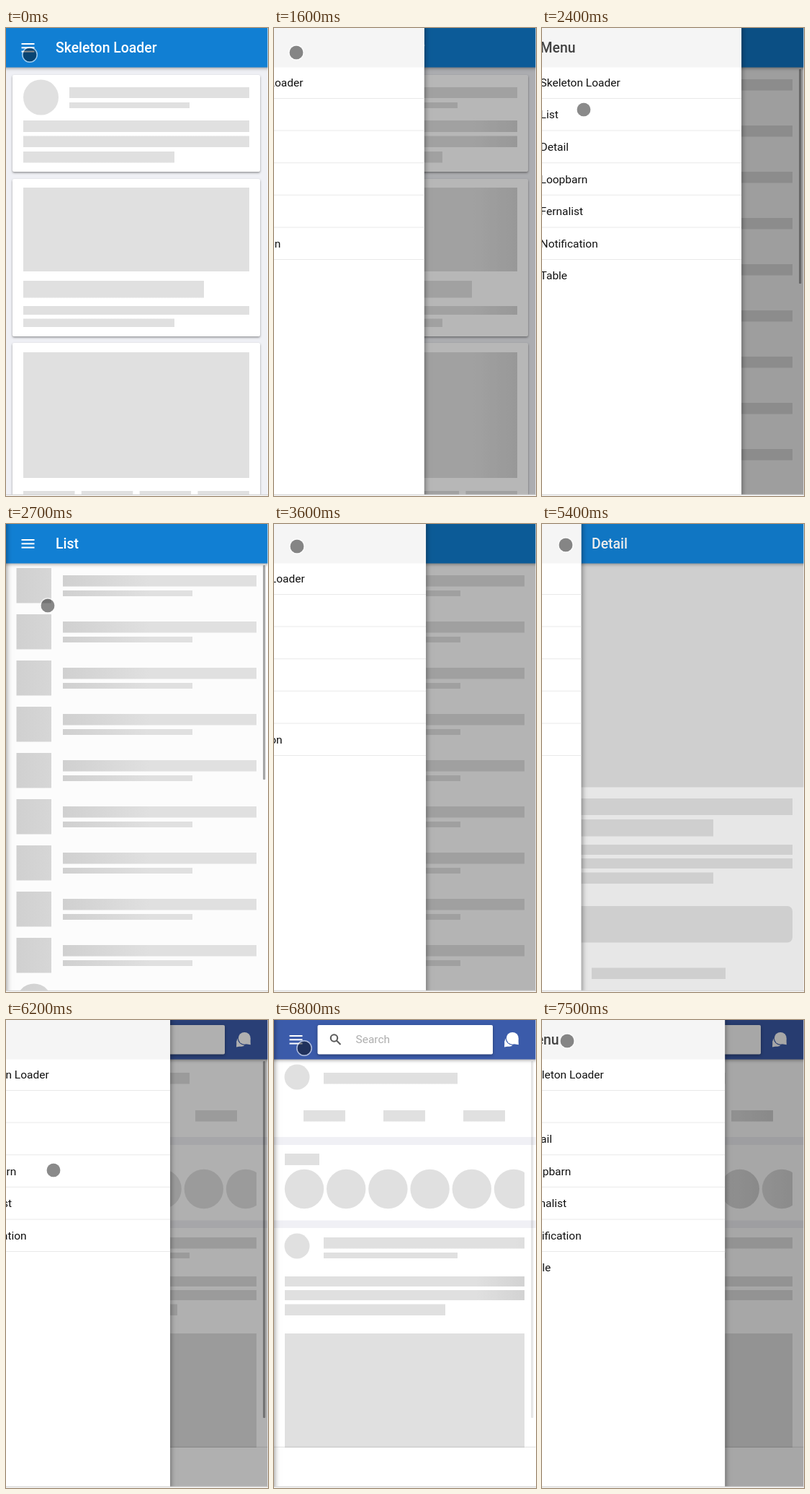
An HTML page with a canvas that plays this animation: 364x648 px, repeating every 7600 ms.

```html
<!DOCTYPE html>
<html lang="en">
<head>
<meta charset="utf-8">
<title>Skeleton Loader</title>
<style>
html, body { margin: 0; width: 100%; height: 100%; overflow: hidden; background: #fff; }
canvas { display: block; width: 364px; height: 648px; }
</style>
</head>
<body>
<canvas></canvas>
<script>
const W = 364, H = 648, LOOP = 7600, MENU_W = 295, SLIDE = 280;
const BLUE = '#117fd3', NAVY = '#3b5baa', BASE = '#e0e0e0', DARK = '#d0d0d0';
const canvas = document.querySelector('canvas');
const ctx = canvas.getContext('2d');
const dpr = window.devicePixelRatio || 1;
canvas.width = W * dpr;
canvas.height = H * dpr;

const items = ['Skeleton Loader', 'List', 'Detail', 'Loopbarn', 'Fernalist', 'Notification', 'Table'];

// since: start of the shimmer; bar: bottom end of the scroll indicator
const pages = [
  { from: 0, since: -100, draw: home },
  { from: 2354, since: 2354, draw: list, bar: 354 },
  { from: 4264, since: 4264, draw: detail, bar: 640 },
  { from: 6110, since: 6085, draw: feed, bar: 551 }
];
const slides = [[1502, 2354], [3500, 4264], [5386, 6110], [7352, 9000]]; // [open, close]
const touches = [ // [time, x, y]
  [0, 33, 37], [800, 30, 32], [1600, 31, 34], [1700, 31, 34], [2200, 58, 113], [2750, 58, 113],
  [3350, 32, 31], [3650, 32, 31], [4150, 71, 163], [4550, 71, 163], [5200, 33, 29],
  [5600, 33, 29], [6000, 66, 208], [6350, 66, 208], [6800, 42, 39], [7100, 35, 29], [7600, 35, 29]
];

const clamp = v => Math.min(1, Math.max(0, v));
let shift = 0; // current shimmer offset

function bezier(x1, y1, x2, y2, t) {
  const at = (a, b, s) => 3 * (1 - s) * (1 - s) * s * a + 3 * (1 - s) * s * s * b + s ** 3;
  let lo = 0, hi = 1;
  for (let i = 0; i < 20; i++) {
    const mid = (lo + hi) / 2;
    if (at(x1, x2, mid) < t) lo = mid; else hi = mid;
  }
  return at(y1, y2, lo);
}

function rect(x, y, x2, y2, fill, r = 0) {
  ctx.fillStyle = fill;
  ctx.beginPath();
  ctx.roundRect(x, y, x2 - x, y2 - y, r);
  ctx.fill();
}

function raised(blur, dy, alpha, draw) {
  ctx.save();
  ctx.shadowColor = `rgba(0,0,0,${alpha})`;
  ctx.shadowBlur = blur * dpr;
  ctx.shadowOffsetY = dy * dpr;
  draw();
  ctx.restore();
}

function text(str, x, y, size, color, weight = 400) {
  ctx.font = `${weight} ${size}px Roboto, sans-serif`;
  ctx.fillStyle = color;
  ctx.fillText(str, x, y);
}

function disc(x, y, r, fill) {
  ctx.fillStyle = fill;
  ctx.beginPath();
  ctx.arc(x, y, r, 0, 7);
  ctx.fill();
}

// Placeholder block; the shimmer is placed relative to its own left edge
function bone(x, y, x2, y2, r = 0) {
  const g = ctx.createLinearGradient(x + shift + 64, 0, x + shift + 264, 0);
  g.addColorStop(0, BASE);
  g.addColorStop(0.4, DARK);
  g.addColorStop(1, BASE);
  rect(x, y, x2, y2, g, r);
}

const roundBone = (x, y, r) => bone(x - r, y - r, x + r, y + r, r);

function header(color, title) {
  raised(5, 1.5, 0.4, () => rect(-9, -9, W + 9, 54.5, color));
  for (const y of [21, 26.3, 31.6]) rect(21.5, y, 39.5, y + 2, '#fff');
  if (title) text(title, 69, 34.2, 19.4, '#fff', 500);
}

function card(y, y2) {
  raised(3, 1.5, 0.4, () => rect(9, y, 353, y2, '#fff', 2));
}

function home() {
  rect(0, 0, W, H, '#eff0f5');
  card(65, 199);
  roundBone(48.5, 96, 24.5);
  bone(88, 82, 338, 97);
  bone(88, 103, 255, 111);
  bone(24, 128, 338, 144);
  bone(24, 149.5, 338, 165);
  bone(24, 171, 234, 186.5);
  card(209, 427);
  bone(24, 221, 338, 337);
  bone(24, 350, 275, 373.5);
  bone(24, 385, 338, 397);
  bone(24, 402.5, 234, 414);
  card(436, 700);
  bone(24, 449, 338, 623);
  for (let i = 0; i < 4; i++) bone(24 + 80.8 * i, 641, 95.5 + 80.8 * i, 660);
  header(BLUE, 'Skeleton Loader');
}

function list() {
  rect(0, 0, W, H, '#fcfcfc');
  for (let i = 0; i < 9; i++) {
    const y = 61 + 64 * i;
    bone(14.5, y, 63, y + 48.5);
    bone(79, y + 10, 348, y + 25.5);
    bone(79, y + 31, 259, y + 39);
  }
  roundBone(39, 661, 24.5);
  header(BLUE, 'List');
}

function detail() {
  rect(0, 0, W, H, '#fafafa');
  bone(0, 54, W, 364.5);
  bone(15, 380, 348, 403);
  bone(15, 409, 238, 432.5);
  bone(15, 444, 348, 458);
  bone(15, 463, 348, 477);
  bone(15, 482.5, 238, 498);
  bone(15, 529, 348, 579.5, 7);
  roundBone(32, 621, 17.5);
  bone(69, 614.5, 255, 630);
  header(BLUE, 'Detail');
}

function feed() {
  rect(0, 0, W, H, '#fff');
  roundBone(32, 79, 17.5);
  bone(69, 73, 255, 88.5);
  for (let i = 0; i < 3; i++) bone(41 + 111 * i, 125, 99 + 111 * i, 140.5);
  rect(0, 162, W, 173, '#f0f0f5');
  bone(15, 185, 63, 201);
  ctx.save();
  ctx.beginPath();
  ctx.rect(0, 200, 348, 70);
  ctx.clip();
  for (let i = 0; i < 6; i++) roundBone(42 + 58.2 * i, 234, 27.2);
  ctx.restore();
  rect(0, 277.5, W, 288, '#f0f0f5');
  roundBone(32, 313, 17.5);
  bone(69, 301, 348, 316.5);
  bone(69, 322, 255, 330);
  bone(15, 355, 348, 369);
  bone(15, 374, 348, 388);
  bone(15, 393.5, 238, 409);
  rect(15, 434, 348, 592, BASE);
  raised(2, -0.5, 0.3, () => rect(-9, 592, W + 9, 670, '#fff'));

  header(NAVY);
  raised(4, 1.5, 0.35, () => rect(60.5, 7, 304, 47.5, '#fff', 2));
  ctx.strokeStyle = '#5b5b5b';
  ctx.lineWidth = 2.1;
  ctx.beginPath();
  ctx.arc(83.5, 25, 4.7, 0, 7);
  ctx.moveTo(87, 28.5);
  ctx.lineTo(92.5, 34);
  ctx.stroke();
  text('Search', 113.5, 32.4, 15.5, '#aeaeae');
  chat();
}

function chat() {
  disc(327, 30, 6.7, '#fff');
  ctx.beginPath();
  ctx.moveTo(320.5, 29);
  ctx.lineTo(320, 37.5);
  ctx.lineTo(328, 36);
  ctx.fill();
  disc(331.3, 25.3, 9.6, NAVY);
  disc(331.3, 25.3, 8.4, '#fff');
  ctx.beginPath();
  ctx.moveTo(339.5, 26);
  ctx.lineTo(339.8, 34.3);
  ctx.lineTo(332, 33);
  ctx.fill();
}

function openness(t) {
  const [open, close] = slides.findLast(s => t >= s[0]) || [Infinity, Infinity];
  if (t < open) return 0;
  if (t < close) return bezier(0, 0, 0.2, 1, clamp((t - open) / SLIDE));
  return 1 - bezier(0.4, 0, 0.6, 1, clamp((t - close) / SLIDE));
}

function menu(amount) {
  if (amount <= 0) return;
  rect(0, 0, W, H, `rgba(0,0,0,${0.4 * amount})`);
  ctx.save();
  ctx.translate(MENU_W * (amount - 1), 0);
  raised(8, 0, 0.5, () => rect(0, -9, MENU_W, H + 9, '#fff'));
  ctx.beginPath();
  ctx.rect(0, 0, MENU_W, H);
  ctx.clip();
  rect(0, 0, MENU_W, 54.5, '#f5f5f5');
  text('Menu', 15.5, 34.2, 19.4, '#424242', 500);
  items.forEach((name, i) => {
    const y = 53 + 44.6 * i;
    text(name, 15.5, y + 27.7, 15.5, '#111');
    if (i < items.length - 1) rect(0, y + 44, MENU_W, y + 45, '#e9e9e9');
  });
  ctx.restore();
}

function touch(t) {
  const i = touches.findIndex(p => p[0] > t);
  const [t0, x0, y0] = touches[i - 1], [t1, x1, y1] = touches[i];
  const k = bezier(0.4, 0, 0.5, 1, (t - t0) / (t1 - t0));
  const x = x0 + (x1 - x0) * k, y = y0 + (y1 - y0) * k;
  disc(x, y, 9.6, 'rgba(0,0,0,.46)');
  ctx.strokeStyle = 'rgba(255,255,255,.6)';
  ctx.lineWidth = 1.5;
  ctx.beginPath();
  ctx.arc(x, y, 10.2, 0, 7);
  ctx.stroke();
}

function frame(now) {
  const t = now % LOOP;
  const page = pages.findLast(p => t >= p.from);
  const age = t - page.since;
  shift = -468 + 936 * (age / 1000 % 1);
  ctx.setTransform(dpr, 0, 0, dpr, 0, 0);
  page.draw();
  if (page.bar) {
    const alpha = 0.34 * clamp((800 - age) / 300);
    rect(357, 57, 360.3, page.bar, `rgba(0,0,0,${alpha})`, 1);
  }
  menu(openness(t));
  touch(t);
  rect(363, 0, W, H, 'rgba(255,255,255,.6)');
  rect(0, 645.7, W, 647, '#d6d6d6');
  rect(0, 647, W, H, '#fafafa');
}

const start = performance.now();
function tick() {
  frame(performance.now() - start);
  requestAnimationFrame(tick);
}
tick();
</script>
</body>
</html>
```
